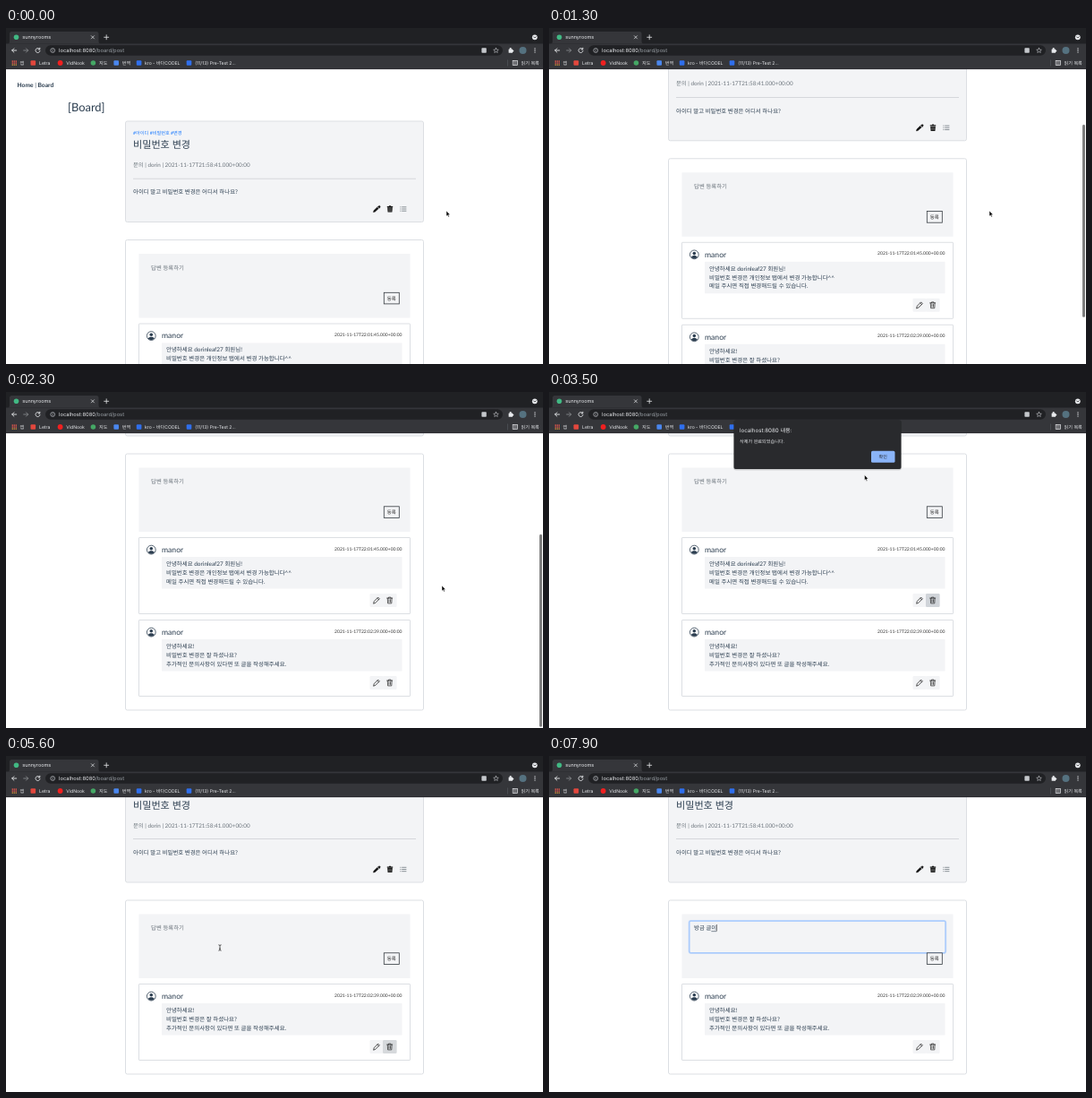
Recreate the animation shown at these times as an HTML page. Size 600x375 px, loop 8 s.

```html
<!DOCTYPE html>
<html lang="ko">
<head>
<meta charset="utf-8">
<style>
html, body { margin: 0; width: 100%; height: 100%; overflow: hidden; background: #fff; }
svg { display: block; width: 600px; height: 375px; }
text { font-family: Lato, "Noto Sans CJK KR", "Noto Sans CJK", sans-serif; white-space: pre; text-rendering: geometricPrecision; }
.ui text { font-family: Inter, "Noto Sans CJK KR", "Noto Sans CJK", sans-serif; }
</style>
</head>
<body>
<svg id="stage" viewBox="0 0 600 375"></svg>
<script>
const LOOP = 8000, MAX_SCROLL = 167.5, CARD_STEP = 92;
const INK = '#2c3e50', GRAY = '#6c757d', PANEL = '#f3f4f6', LINE = '#dcdfe3';
const CLICK_OK = 3950, FOCUS = 5800, TYPE_START = 6700, TYPE_STEP = 100;
const TYPED = ['ㅂ', '바', '방', '방ㄱ', '방그', '방금', '방금 ', '방금 ㄱ', '방금 그', '방금 글', '방금 글ㅇ', '방금 글이'];

const text = (x, y, size, str, fill = INK, extra = '') =>
  `<text x="${x}" y="${y}" font-size="${size}" fill="${fill}" ${extra}>${str}</text>`;
const rect = (x, y, w, h, fill, extra = '') =>
  `<rect x="${x}" y="${y}" width="${w}" height="${h}" fill="${fill}" ${extra}/>`;
const circle = (x, y, r, fill, extra = '') =>
  `<circle cx="${x}" cy="${y}" r="${r}" fill="${fill}" ${extra}/>`;
const line = (d, color, width = .9, extra = '') =>
  `<path d="${d}" fill="none" stroke="${color}" stroke-width="${width}" stroke-linecap="round" stroke-linejoin="round" ${extra}/>`;
const shape = (d, fill, extra = '') => `<path d="${d}" fill="${fill}" ${extra}/>`;
const group = (x, y, inner) => `<g transform="translate(${x} ${y})">${inner}</g>`;

const pencil = group(414, 202, shape('M1.3-2.6l2-1.2 1 1-1 2zM.7-2L2.3-.4-1.8 3.2-3.6 3.6-3.1 1.7z', '#111', 'stroke="#111" stroke-width=".4"'));
const trash = group(429, 202, shape('M-3.2-3h2l.4-.7h1.6l.4.7h2v1.2h-6.4zM-2.8-1.4h5.6l-.4 5h-4.8z', '#111') +
  line('M-1.1-.4v3M0-.4v3M1.1-.4v3', '#bbb', .4));
const list = group(444, 202, line('M-1.4-2.2h4.4M-1.4 0h4.4M-1.4 2.2h4.4M-3.3-2.2h.3M-3.3 0h.3M-3.3 2.2h.3', GRAY, .8));
const pencilLine = line('M-3.3 3.3l.7-2.4 4.3-4.3 1.7 1.7-4.3 4.3zM.7-2.4l1.7 1.7', '#222', .75);
const trashLine = line('M-3-2.4h6M-1.2-2.4v-1h2.4v1M-2.4-2.4l.3 5.8h4.2l.3-5.8M-.8-.8v2.7M.8-.8v2.7', '#222', .7);
const person = circle(0, 0, 4.9, '#fff', `stroke="${INK}" stroke-width=".8"`) + circle(0, -1.3, 1.8, INK) +
  shape('M-3.5 3.1C-2.4 .6 2.4 .6 3.5 3.1Q0 6-3.5 3.1', INK);

// One comment card; its top edge is at y = 0.
function comment(id, date, rows) {
  return `<g id="${id}">` + rect(148.5, 0, 303, 85, '#fff', `stroke="${LINE}" rx=".5"`) +
    group(162.3, 13.6, person) + text(174, 16.4, 8.6, 'manor') +
    text(442.5, 14, 5, date, '#333', 'text-anchor="end"') +
    rect(174, 21.5, 268.5, 35.5, PANEL) +
    rows.map((row, i) => text(179, 31.3 + i * 9.95, 6.45, row)).join('') +
    rect(406.5, 62.5, 15, 15, '#f3f4f6', 'rx="1.3"') +
    rect(421, 62.5, 15.6, 15, '#f3f4f6', 'rx="1.3" class="del"') +
    group(414, 70, pencilLine) + group(428.7, 70, trashLine) + '</g>';
}

const post =
  text(12.5, 65.8, 6.7, 'Home <tspan font-weight="400">|</tspan> Board', INK, 'font-weight="700"') +
  text(69, 93.3, 12.9, '[Board]') +
  rect(133.5, 104, 333, 112.5, PANEL, `stroke="${LINE}" rx="2"`) +
  text(142, 119.4, 5.2, '#아이디 #비밀번호 #변경', '#1677ff') +
  text(142, 134.3, 11.1, '비밀번호 변경') +
  text(142, 155.2, 6.3, '문의 | dorin | 2021-11-17T21:58:41.000+00:00', GRAY) +
  rect(142, 167.8, 316, .7, '#c9ccd0') +
  text(142, 185.4, 6.4, '아이디 말고 비밀번호 변경은 어디서 하나요?') +
  pencil + trash + list;

const answers =
  `<rect id="card" x="133.5" y="236.5" width="333" height="286" rx="2" fill="#fff" stroke="${LINE}"/>` +
  rect(148.5, 252, 303, 71.5, PANEL) +
  '<g id="area">' + rect(156.6, 259.4, 286.6, 36, PANEL, 'rx="1.8" stroke="#c7dcfb" stroke-width="2"') +
  rect(156.8, 259.6, 286.2, 35.6, 'none', 'rx="1.6" stroke="#86b7fe" stroke-width=".6"') + '</g>' +
  text(162, 269.7, 6.4, '답변 등록하기', GRAY, 'id="hint"') +
  text(162, 269.7, 6.4, '', INK, 'id="typed"') +
  rect(0, 271, 5.8, .6, INK, 'id="under"') + rect(0, 263.5, .5, 7.5, '#111', 'id="caret"') +
  rect(422.3, 295.3, 17, 12.6, PANEL, 'stroke="#343a40" stroke-width=".8"') +
  text(430.8, 303.7, 5.4, '등록', '#222', 'text-anchor="middle"') +
  comment('first', '2021-11-17T22:01:45.000+00:00',
    ['안녕하세요 dorinleaf27 회원님!', '비밀번호 변경은 개인정보 탭에서 변경 가능합니다^^', '메일 주시면 직접 변경해드릴 수 있습니다.']) +
  comment('second', '2021-11-17T22:02:39.000+00:00',
    ['안녕하세요!', '비밀번호 변경은 잘 하셨나요?', '추가적인 문의사항이 있다면 또 글을 작성해주세요.']);

const PALE = '#e8eaed';
const mark = (x, str, textX) => text(textX, 41, 5.1, str, PALE);
const square = (x, color) => rect(x - 2.8, 36.2, 5.6, 5.6, color, 'rx="1"');
let apps = '';
for (let i = 0; i < 9; i++)
  apps += rect(6.6 + i % 3 * 2, 36.4 + (i / 3 | 0) * 2, 1.4, 1.4, ['#e2574c', '#d9534f', '#c98b3c'][i / 3 | 0]);

const chrome = rect(0, 0, 600, 46, '#35363a') + rect(0, 0, 600, 17.5, '#202124') +
  shape('M2 17.5Q4 17.5 4 15V6.5Q4 4 6.5 4H101Q103.500 4 103.500 6.500V15Q103.500 17.500 105.500 17.500Z', '#35363a') +
  circle(11.5, 10.3, 2.8, '#41b883') + text(18.3, 12.4, 5.5, 'sunnyrooms', PALE) +
  line('M95.3 8.700l3.200 3.200M98.500 8.700l-3.200 3.200', PALE, .7) +
  line('M109.700 10.300h5M112.200 7.800v5', PALE, .8) +
  circle(590.8, 10.3, 2.9, PALE) + line('M589.500 9.800l1.300 1.300 1.300-1.300', '#202124', .8) +
  line('M11.700 25h-5M8.900 22.800l-2.200 2.200 2.200 2.200', PALE) +
  line('M19.700 25h5M22.500 22.800l2.200 2.200-2.200 2.200', '#85878b') +
  line('M37.600 23.600A2.500 2.500 0 1 0 38 25.600M37.800 22.200v1.700h-1.700', PALE) +
  rect(44, 19.3, 511, 11.5, '#202124', 'rx="5.75"') +
  circle(52.2, 25, 2.4, 'none', 'stroke="#bdc1c6" stroke-width=".7"') + line('M52.200 24.800v1.300M52.200 23.700v.01', '#bdc1c6', .6) +
  text(59, 27.1, 5.8, 'localhost:8080<tspan fill="#9aa0a6">/board/post</tspan>', PALE) +
  rect(531.4, 22.3, 5.4, 5.4, '#c4c7cb', 'rx=".8"') +
  line('M547.500 22.300l.8 1.800 2 .2-1.500 1.300.4 1.900-1.700-1-1.700 1 .4-1.900-1.500-1.300 2-.2z', '#c4c7cb', .6) +
  rect(561.6, 23.4, 4.4, 4.4, PALE, 'rx=".6"') + circle(563.7, 23, 1.1, PALE) + circle(566.2, 25.6, 1.1, PALE) +
  circle(577.5, 25, 4, '#557280') +
  [22.9, 25, 27.1].map(y => circle(591, y, .65, PALE)).join('') +
  apps + text(15.5, 41, 5.1, '앱', PALE) +
  square(30.3, '#e2473d') + text(37, 41, 5.1, 'Letra', PALE) +
  circle(60.6, 39, 2.9, '#f02020') + text(67.3, 41, 5.1, 'VidNook', PALE) +
  circle(97.4, 39, 2.8, '#45a765') + text(104, 41, 5.1, '지도', PALE) +
  square(123.2, '#4a87ee') + text(129.8, 41, 5.1, '번역', PALE) +
  square(148.6, '#2f6fed') + text(155, 41, 5.1, 'kro - 바다CODEL', PALE) +
  square(204.5, '#2f6fed') + text(211.3, 41, 5.1, '(11/13) Pre-Test 2...', PALE) +
  rect(560.4, 35.500, .5, 7, '#5f6368') +
  rect(566.2, 36.4, 5.2, 5.2, 'none', `stroke="${PALE}" stroke-width=".7"`) +
  line('M568 36.600v4.800M569 38h1.500M569 40h1.500', PALE, .6) +
  text(575.6, 41, 5.1, '읽기 목록', PALE) + rect(0, 45.6, 600, .5, '#242528');

const dialog = '<g id="dialog">' +
  rect(206, 31.5, 188, 56, '#000', 'rx="3" opacity=".15"') +
  rect(206.5, 31.3, 187, 54.7, '#292a2d', 'rx="2"') +
  text(213, 45, 6.2, 'localhost:8080 내용:', PALE) +
  text(213, 56.6, 5.15, '삭제가 완료되었습니다.', PALE) +
  rect(360, 65.8, 26.5, 13, '#8ab4f8', 'rx="1.6"') +
  text(373.2, 74.2, 5, '확인', '#202124', 'text-anchor="middle"') + '</g>';

const pointers = '<g id="pointer">' +
  shape('M0 0V6.100L1.400 4.900 2.300 7 3.300 6.600 2.400 4.500H4.200Z', '#000', 'class="arrow" stroke="#fff" stroke-width=".5"') +
  shape('M-.6 0Q0-.7.6 0V2.500L3 3.200Q3.500 3.500 3.200 5L2.700 7H-.8L-2.600 4.300Q-2.300 3.500-.6 4.500Z', '#fff', 'class="hand" stroke="#000" stroke-width=".5"') +
  line('M-1.200-3.200Q0-3.200 0-2.500Q0-3.200 1.200-3.200M0-2.500V2.500M-1.200 3.200Q0 3.200 0 2.500Q0 3.200 1.200 3.200M-.6 1h1.200', '#222', .7, 'class="beam"') + '</g>';

const stage = document.getElementById('stage');
stage.innerHTML = rect(0, 0, 600, 375, '#fff') + `<g id="page">${post}${answers}</g>` +
  rect(596, 0, 3, 215, '#7d7d7d', 'rx="1.5" id="thumb"') + `<g class="ui">${chrome}${dialog}</g>` + pointers;

const $ = sel => stage.querySelector(sel);
const show = (el, on) => el.setAttribute('display', on ? 'inline' : 'none');
const move = (el, x, y) => el.setAttribute('transform', `translate(${x} ${y})`);
const parts = Object.fromEntries(
  ['page', 'thumb', 'card', 'first', 'second', 'area', 'hint', 'typed', 'under', 'caret', 'dialog', 'pointer'].map(id => [id, $('#' + id)]));
const [arrow, hand, beam] = ['.arrow', '.hand', '.beam'].map($);
const [del1, del2] = ['#first .del', '#second .del'].map($);

// Keys are [time, ...values].
function along(keys, t, ease = u => u) {
  const i = keys.findIndex(k => k[0] > t);
  if (i < 0) return keys[keys.length - 1].slice(1);
  if (i === 0) return keys[0].slice(1);
  const a = keys[i - 1], b = keys[i], u = ease((t - a[0]) / (b[0] - a[0]));
  return a.slice(1).map((v, j) => v + (b[j + 1] - v) * u);
}
const smooth = u => u * u * (3 - 2 * u);
const SCROLL = [[900, 0], [1000, 19.5], [1200, 68], [1400, 113], [1550, 136], [1700, 152], [1850, 162], [2000, MAX_SCROLL]];
const MOUSE = [[1950, 492, 204], [2300, 487, 216], [2650, 428, 230], [3200, 428, 230], [3500, 352.5, 92.5],
  [3750, 372, 73], [4000, 372, 73], [4450, 492, 180], [4700, 486, 190], [5400, 239, 214]];

function draw(t) {
  const deleted = t >= CLICK_OK, focused = t >= FOCUS;
  const scroll = deleted ? MAX_SCROLL - CARD_STEP : along(SCROLL, t)[0];
  move(parts.page, 0, -scroll);
  parts.card.setAttribute('height', deleted ? 286 - CARD_STEP : 286);
  show(parts.first, !deleted);
  move(parts.first, 0, 330);
  move(parts.second, 0, deleted ? 330 : 330 + CARD_STEP);

  show(parts.thumb, t >= 950 && t < 2650);
  parts.thumb.setAttribute('y', 47.5 + scroll * .664);
  parts.thumb.setAttribute('opacity', along([[2400, 1], [2650, 0]], t)[0]);

  // The pressed button keeps its focus colour until the text area is clicked.
  del1.setAttribute('fill', t >= 2600 ? '#d0d4d9' : PANEL);
  del2.setAttribute('fill', deleted && !focused ? '#d6d9dc' : PANEL);
  show(parts.dialog, t >= 3200 && !deleted);

  const step = Math.min(Math.floor((t - TYPE_START) / TYPE_STEP), TYPED.length - 1);
  const typed = step < 0 ? '' : TYPED[step];
  show(parts.area, focused);
  show(parts.hint, !typed);
  parts.typed.textContent = typed;
  const end = 162 + (typed ? parts.typed.getComputedTextLength() : 0);
  parts.under.setAttribute('x', end - 5.8);
  show(parts.under, typed && !typed.endsWith(' '));
  parts.caret.setAttribute('x', end);
  show(parts.caret, focused && (typed || (t - FOCUS) % 1000 < 500));

  const [x, y] = along(MOUSE, t, smooth);
  const overTrash = t >= 2600 && t < 3200, overArea = t >= 5150;
  move(parts.pointer, x, y);
  show(parts.pointer, !typed);
  show(hand, overTrash);
  show(beam, overArea);
  show(arrow, !overTrash && !overArea);
}

const start = performance.now();
function tick() {
  draw((performance.now() - start) % LOOP);
  requestAnimationFrame(tick);
}
tick();
</script>
</body>
</html>
```
